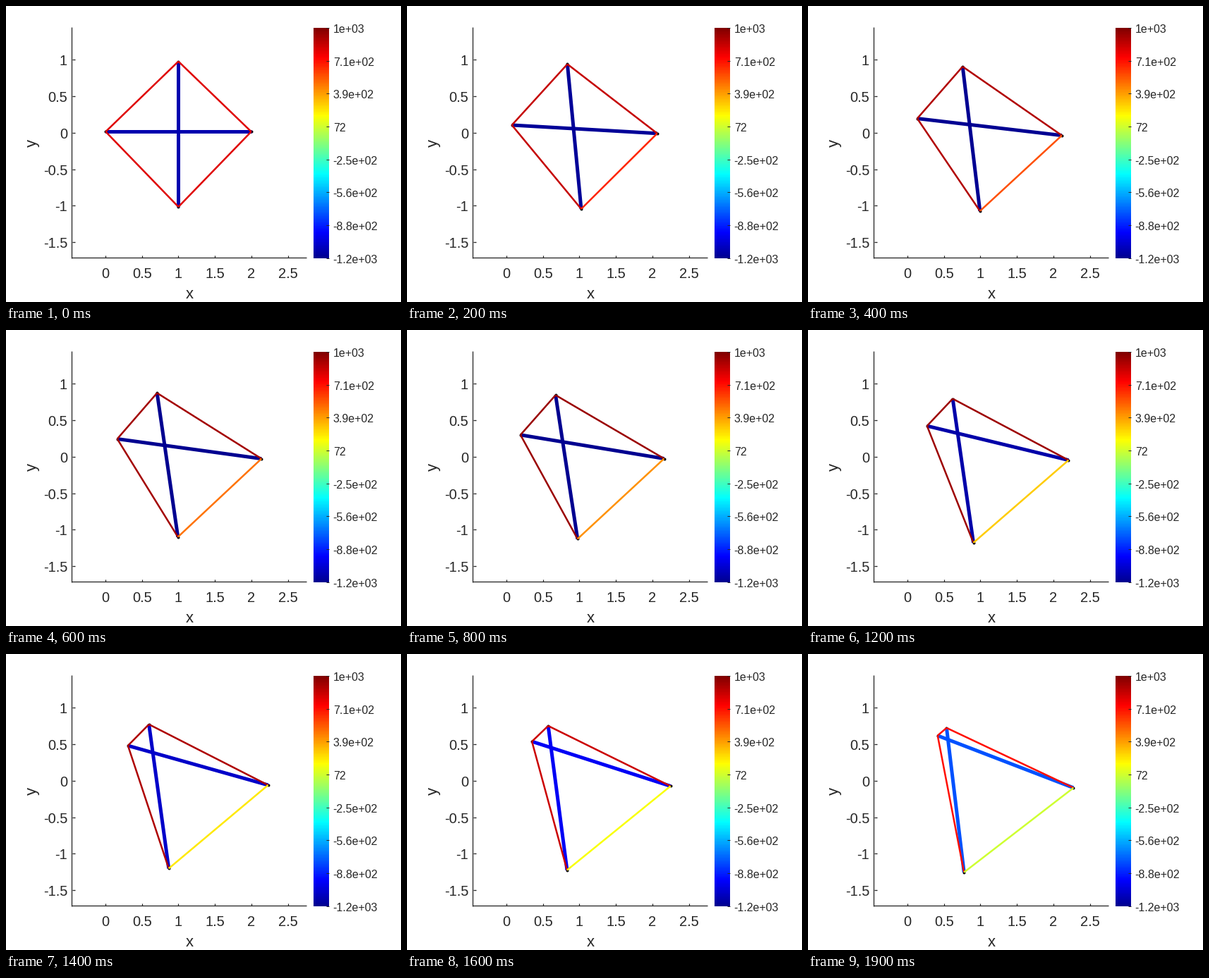
Write a matplotlib script that moves like this. It is 560 px wide and 420 px high and loops after 2000 ms.

```python
import math

import numpy as np
import matplotlib.pyplot as plt
from matplotlib.animation import FuncAnimation

W, H, DPI = 560, 420, 100
FRAMES, INTERVAL = 20, 100
PX = 72 / DPI
INK = "#262626"
HALF = 103.2  # half the length of a rigid strut

plt.rcParams["font.family"] = "Liberation Sans"
plt.rcParams["path.simplify"] = False


def jet(level):
    """Rainbow map over levels 0 to 63."""
    i = np.asarray(level, float)
    r = np.minimum(i - 23, 71 - i)
    g = np.minimum(i - 7, 55 - i)
    b = np.minimum(i + 9, 39 - i)
    return np.clip(np.stack([r, g, b], axis=-1) / 16, 0, 1)


def pose(t):
    """Node positions: both struts turn while drifting in opposite directions."""
    rise = 1 - math.exp(-t / 2.2)
    swing = math.exp(-((t - 4) / 2) ** 2)
    dx = 1.57 * t + 5.8 * rise + 1.8 * swing
    dy = 1.75 * t - 0.0215 * t * t
    a = math.radians(1.06 * t + 0.9 * rise + 1.7 * swing) if t else 0
    b = math.radians(10.5 * rise - 0.19 * t - 1.2 * swing) if t else 0
    mid_a = np.array([244.45 + dx, 178.3 - dy])
    mid_b = np.array([244.45 - dx, 181.8 + dy])
    arm_a = HALF * np.array([math.cos(a), math.sin(a)])
    arm_b = HALF * np.array([math.sin(b), math.cos(b)])
    return np.array([mid_a - arm_a, mid_b - arm_b, mid_a + arm_a, mid_b + arm_b])


def colours(t):
    """Colours of the struts, the taut cables and the slackening cable."""
    strut = 2 * math.exp(-t / 1.5) + 0.1 * max(t - 8, 0) ** 2
    taut = 61.5 - (0.09 if t > 10 else 0.045) * (t - 10) ** 2
    slack = 57 - 0.9 * t - 4 * (1 - math.exp(-t / 2.2))
    return jet(strut), jet(taut), jet(slack)


fig = plt.figure(figsize=(W / DPI, H / DPI), dpi=DPI, facecolor="white")
ax = fig.add_axes([0, 0, 1, 1])
ax.axis("off")


def line(xs, ys, width=1.3, color=INK, z=2):
    return ax.plot(xs, ys, color=color, lw=width * PX, zorder=z,
                   solid_capstyle="butt")[0]


def label(x, y, text, size, ha="center", **kw):
    ax.text(x, y, text, fontsize=size * PX, color=INK, ha=ha,
            va="baseline", **kw)


# Axes
line([93.4, 93.4], [30, 358])
line([93, 426], [357, 357])
for i in range(6):
    x = 140.9 + 51.75 * i
    line([x, x], [357, 353.5])
    label(x, 386.5, f"{i / 2:g}", 20)
    y = 76.2 + 51.8 * i
    line([93.5, 97.5], [y, y])
    label(87, y + 8, f"{1 - i / 2:g}", 20, "right")
label(260.3, 415.3, "x", 22)
label(43.3, 194.5, "y", 22, rotation=90, rotation_mode="anchor")

# Colour bar
ax.imshow(jet(np.linspace(63, 0, 256))[:, None, :],
          extent=(435.5, 457.5, 358, 31), aspect="auto",
          interpolation="nearest", zorder=1)
for i in range(8):
    y = 31.5 + 46.65 * i
    line([454, 457.5], [y - 0.5, y - 0.5], 1)
    label(463.7, y + 6.6, f"{1027.3 - 318.4 * i:.2g}", 16, "left")

# Truss: node order is left, top, right, bottom
joints = ax.plot([], [], "o", color="black", ms=4 * PX, mew=0, zorder=3)[0]
struts = [(line([], [], 5, z=4), pair) for pair in ([0, 2], [1, 3])]
cables = [(line([], [], 2.5, z=5), pair)
          for pair in ([0, 1], [1, 2], [3, 0], [2, 3])]

ax.set_xlim(0, W)
ax.set_ylim(H, 0)


def draw(frame):
    p = pose(frame)
    strut, taut, slack = colours(frame)
    joints.set_data(p[:, 0], p[:, 1])
    for bars, tint in ((struts, strut), (cables, taut)):
        for bar, pair in bars:
            bar.set_data(p[pair, 0], p[pair, 1])
            bar.set_color(tint)
    cables[-1][0].set_color(slack)
    return [joints] + [bar for bar, _ in struts + cables]


anim = FuncAnimation(fig, draw, frames=FRAMES, interval=INTERVAL,
                     init_func=lambda: draw(0), repeat=True, repeat_delay=0)
plt.show()
```
